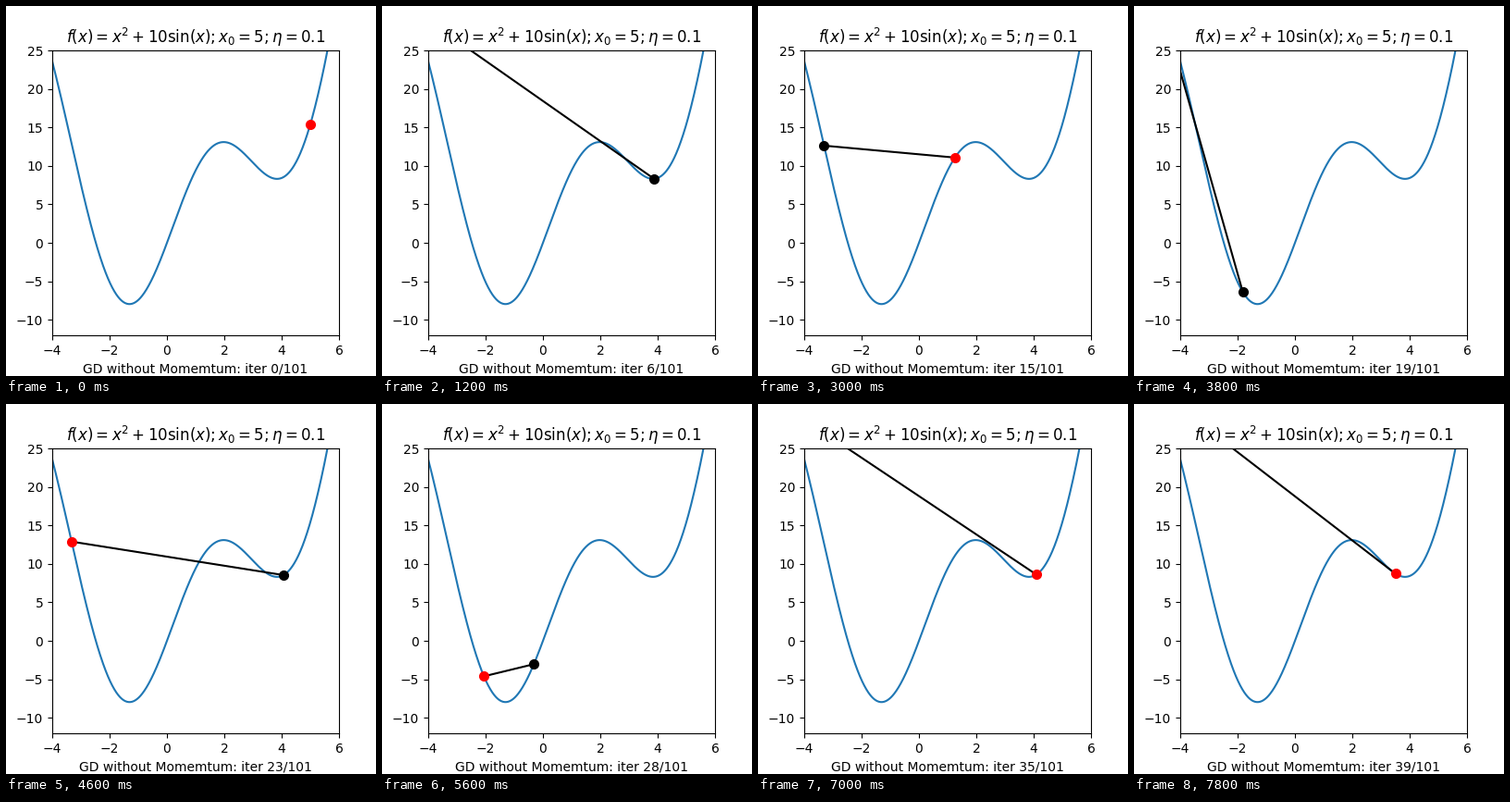
Animation, 400 px wide and 400 px high, one loop 8 s. Source, as a matplotlib script:

```python
import numpy as np
import matplotlib.pyplot as plt
from matplotlib.animation import FuncAnimation

STEPS = 100
SHOWN = 40
ETA, GAMMA = 0.5, 0.9


def cost(x):
    return x**2 + 10 * np.sin(x)


def grad(x):
    return 2 * x + 10 * np.cos(x)


def descend(start):
    """Accelerated descent: the gradient is taken at the look-ahead point."""
    path = [start]
    v = np.zeros_like(start)
    for _ in range(STEPS):
        v = GAMMA * v + ETA * grad(path[-1] - GAMMA * v)
        path.append(path[-1] - v)
    return np.array(path)


xs = descend(5)
ys = cost(xs)

fig, ax = plt.subplots(figsize=(4, 4), dpi=100)
ax.axis([-4, 6, -12, 25])
ax.set_title(r"$f(x) = x^2 + 10\sin(x); x_0 = 5; \eta = 0.1$")

grid = np.linspace(-4, 6, 1000)
ax.plot(grid, cost(grid))
before, = ax.plot([], [], "ok", markersize=7)
link, = ax.plot([], [], "k-")
now, = ax.plot([], [], "ro", markersize=7)


def update(i):
    prev = max(i - 1, 0)
    before.set_data(xs[prev:i], ys[prev:i])
    link.set_data(xs[prev:i + 1], ys[prev:i + 1])
    now.set_data(xs[i:i + 1], ys[i:i + 1])
    ax.set_xlabel(f"GD without Momemtum: iter {i}/{len(xs)}")
    return before, link, now


anim = FuncAnimation(fig, update, frames=SHOWN, interval=200,
                     repeat=True, repeat_delay=0)
plt.show()
```
